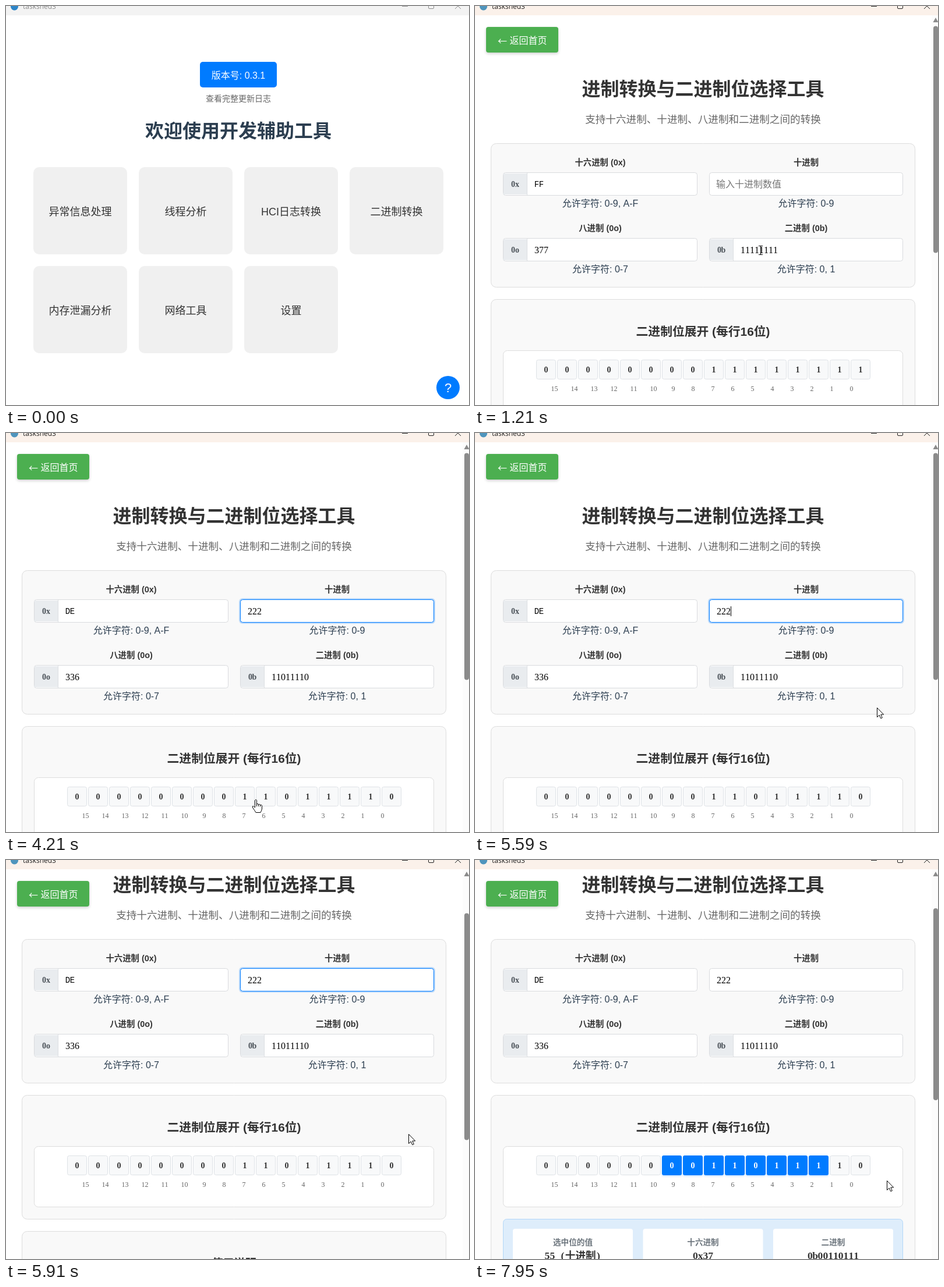
An HTML page with a canvas that plays this animation: 795 px wide and 686 px high, repeating every 8000 ms.

```html
<!DOCTYPE html>
<html lang="zh-CN">
<head>
<meta charset="utf-8">
<title>进制转换</title>
<style>
html, body { margin: 0; width: 100%; height: 100%; overflow: hidden; background: #fff; }
canvas { display: block; }
</style>
</head>
<body>
<canvas id="stage" width="795" height="686"></canvas>
<script>
const c = document.getElementById('stage').getContext('2d');
const LOOP = 8000;
const SANS = '"Liberation Sans", "Noto Sans CJK SC", sans-serif';
const SERIF = '"Liberation Serif", "Noto Sans CJK SC", serif';
const BLUE = '#007bff';

// Timeline in ms
const ACTIVE = 430, PAGE = 580, FOCUS = 2200, KEYS = [2820, 3010, 3200];
const SCROLL = 5720, DRAG = 7040, DROP = 7560, RESULT = 7620;
const PRESSES = [[430, 550], [FOCUS, 2340], [DRAG, DROP]];
const HIDDEN = [KEYS[0], 3300];

// Pointer path: time, x, y
const PATH = [
  [75, 800, 470], [380, 690, 362], [810, 690, 362], [1000, 490, 420], [1210, 490, 420],
  [1500, 166, 308], [1640, 166, 308], [1880, 430, 303], [2140, 430, 303], [2260, 431, 295],
  [2690, 431, 295], [2800, 438, 290], [3300, 438, 292], [3480, 442, 380], [3900, 500, 560],
  [4340, 410, 648], [4600, 365, 655], [4900, 595, 655], [5190, 420, 666], [5300, 440, 650],
  [5570, 690, 472], [5720, 690, 472], [5900, 691, 471], [6120, 691, 471], [6480, 423, 547],
  [6680, 356, 546], [6880, 344, 531], [7190, 344, 531], [7500, 580, 530], [7750, 580, 530],
  [7940, 707, 551], [LOOP, 707, 551]
];

const clamp = v => Math.max(0, Math.min(1, v));
const ease = v => { v = clamp(v); return v * v * (3 - 2 * v); };

function pointer(t) {
  const i = PATH.findIndex(p => p[0] > t);
  if (i < 1) return null;
  const [t0, x0, y0] = PATH[i - 1], [t1, x1, y1] = PATH[i];
  const k = ease((t - t0) / (t1 - t0));
  return { x: x0 + (x1 - x0) * k, y: y0 + (y1 - y0) * k };
}

function text(s, x, y, size, color, { bold, align = 'center', font = SANS, lift = .37 } = {}) {
  c.font = `${bold ? 'bold ' : ''}${size}px ${font}`;
  c.textAlign = align;
  c.fillStyle = color;
  c.fillText(s, x, y + size * lift);
}

// Fixed pitch: half an em for Latin, a full em for CJK
const pitch = (ch, size) => ch > '\u2000' ? size : size / 2;

function mono(s, x, y, size, color, bold) {
  for (const ch of s) {
    const w = pitch(ch, size), capital = /[A-F]/.test(ch);
    text(ch, x + w / 2, y, capital ? size * .87 : size, color,
      { bold, font: capital ? '"Liberation Mono", monospace' : SERIF, lift: .34 });
    x += w;
  }
}

function monoMid(s, x, y, size, color, bold = true) {
  const w = [...s].reduce((sum, ch) => sum + pitch(ch, size), 0);
  mono(s, x - w / 2, y, size, color, bold);
}

function box(x, y, w, h, r, fill, line) {
  c.beginPath();
  if (line) c.roundRect(x + .5, y + .5, w - 1, h - 1, r);
  else c.roundRect(x, y, w, h, r);
  c.fillStyle = fill;
  c.fill();
  if (line) { c.strokeStyle = line; c.lineWidth = 1; c.stroke(); }
}

function shadow(color, blur, dy, draw) {
  c.save();
  c.shadowColor = color;
  c.shadowBlur = blur;
  c.shadowOffsetY = dy;
  draw();
  c.restore();
}

function disc(x, y, r, fill) {
  c.beginPath();
  c.arc(x, y, r, 0, 7);
  c.fillStyle = fill;
  c.fill();
}

function titleBar(on) {
  c.fillStyle = on ? '#fbf1ea' : '#f3f3f3';
  c.fillRect(0, 0, 795, 16);
  disc(14.5, 1, 6.5, on ? '#4f95bd' : '#2e86c8');
  const ink = on ? '#222' : '#8c8c8c';
  text('taskshed3', 29, 1, 12, ink, { align: 'left', font: '"Open Sans", "Noto Sans", sans-serif' });
  c.strokeStyle = ink;
  c.lineWidth = 1;
  c.beginPath();
  c.moveTo(680, .5); c.lineTo(690, .5);
  c.roundRect(725.5, -5.5, 9, 10, 1.5);
  c.moveTo(771, -5); c.lineTo(781, 5);
  c.moveTo(781, -5); c.lineTo(771, 5);
  c.stroke();
}

const CARDS = ['异常信息处理', '线程分析', 'HCI日志转换', '二进制转换', '内存泄漏分析', '网络工具', '设置'];
const inside = (p, x, y, w, h) => p && p.x >= x && p.x < x + w && p.y >= y && p.y < y + h;

function home(p) {
  box(333, 96, 132, 44, 5, BLUE);
  text('版本号: 0.3.1', 399, 119, 16, '#fff');
  text('查看完整更新日志', 399, 159, 14, '#666');
  text('欢迎使用开发辅助工具', 399, 214, 32, '#2c3e50', { bold: true });
  CARDS.forEach((name, i) => {
    const x = 47 + i % 4 * 181, y = 277 + (i >> 2) * 170;
    box(x, y, 161, 150, 10, inside(p, x, y, 161, 150) ? '#e3e3e3' : '#f0f0f0');
    text(name, x + 80.5, y + 76, 18, '#333');
  });
  disc(759, 656, 20, BLUE);
  text('?', 759, 656, 22, '#fff');
}

function field(x, right, y, label, hint, prefix, val) {
  const mid = (x + right) / 2;
  text(label, mid, y - 17, 14.4, '#333', { bold: true });
  box(x, y, right - x, 40, 4, '#fff', '#d9dbde');
  if (prefix) {
    c.fillStyle = '#e9ecef';
    c.fillRect(x + 1, y + 2, 41, 36);
    c.fillStyle = '#dcdfe2';
    c.fillRect(x + 41, y + 1, 1, 38);
    monoMid(prefix, x + 21, y + 20.5, 14, '#495057');
    mono(val, x + 54, y + 20.5, 16, '#000');
  }
  text('允许字符: ' + hint, mid, y + 53, 16, '#2c3e50');
}

function decimal(t, typed) {
  const focus = t >= FOCUS && t < DRAG + 160;
  if (focus) {
    if (t < DRAG + 50) box(400, 284, 337, 44, 6, 'rgba(0,123,255,.25)');
    box(402, 286, 333, 40, 4, '#fff', BLUE);
  }
  if (typed) mono(typed, 415, 306.5, 16, '#000');
  else text('输入十进制数值', 414, 306, 16, '#757575', { align: 'left' });
  const since = t - (typed ? KEYS[typed.length - 1] : FOCUS);
  if (focus && t < DRAG && since % 1060 < 530) {
    c.fillStyle = '#000';
    c.fillRect(415 + typed.length * 8, 298, 1, 17);
  }
}

function bits(n, t, p) {
  const str = n.toString(2).padStart(16, '0');
  const end = t < DRAG ? -1 : t < DROP ? Math.floor((p.x - 105) / 36) : 13;
  const done = t >= DROP;
  for (let i = 0; i < 16; i++) {
    const x = 105 + i * 36, on = i >= 6 && i <= end;
    if (on && done) shadow('rgba(0,123,255,.2)', 3, 2, () => box(x, 608, 34, 34, 3, BLUE));
    else box(x, 608, 34, 34, 3, on ? '#b3d4f5' : '#f8f9fa', on ? '#a9cdf2' : '#dee2e6');
    monoMid(str[i], x + 17, 625.5, 14, on && done ? '#fff' : '#333');
    monoMid(String(15 - i), 136.5 + i * 34, 658, 12, '#666', false);
  }
}

function results() {
  box(48, 717, 687, 150, 6, '#deedfb', '#b3d7f8');
  [['选中位的值', '55 (十进制)'], ['十六进制', '0x37'], ['二进制', '0b00110111']].forEach(([k, v], i) => {
    const x = 65 + i * 223.5;
    box(x, 734, 206, 90, 4, '#fff');
    text(k, x + 103, 757, 13.6, '#6c757d', { bold: true });
    monoMid(v, x + 103, 780.5, 17.6, '#333');
  });
}

function converter(t, p, scroll) {
  const typed = '2'.repeat(KEYS.filter(k => t >= k).length);
  const n = typed ? +typed : 255;
  const open = t >= RESULT;
  c.save();
  c.beginPath();
  c.rect(0, 16, 795, 670);
  c.clip();
  c.save();
  c.translate(0, -scroll);
  text('进制转换与二进制位选择工具', 391.5, 142, 32, '#333', { bold: true });
  text('支持十六进制、十进制、八进制和二进制之间的转换', 391.5, 194, 17.6, '#666');
  box(27, 236, 729, 248, 9, '#f9f9f9', '#ddd');
  field(48, 382, 286, '十六进制 (0x)', '0-9, A-F', '0x', n.toString(16).toUpperCase());
  field(402, 735, 286, '十进制', '0-9');
  field(48, 382, 399, '八进制 (0o)', '0-7', '0o', n.toString(8));
  field(402, 735, 399, '二进制 (0b)', '0, 1', '0b', n.toString(2));
  decimal(t, typed);
  box(27, 504, 729, open ? 400 : 214, 9, '#f9f9f9', '#ddd');
  text('二进制位展开 (每行16位)', 391.5, 559, 20.8, '#333', { bold: true });
  box(48, 592, 687, 105, 7, '#fff', '#ddd');
  bits(n, t, p);
  if (open) results();
  else {
    box(27, 738, 729, 300, 9, '#f9f9f9', '#ddd');
    text('使用说明', 391.5, 792.5, 19.2, '#333', { bold: true });
  }
  c.restore();

  shadow('rgba(0,0,0,.2)', 5, 2, () => box(19, 36, 124, 44, 4, '#4caf50'));
  text('←', 47, 60, 16, '#fff', { font: '"Noto Sans CJK SC", sans-serif' });
  text('返回首页', 91.5, 59, 16, '#fff');

  c.fillStyle = '#fcfcfc';
  c.fillRect(784, 16, 11, 670);
  c.fillStyle = '#8b8b8b';
  c.beginPath();
  c.moveTo(791, 20); c.lineTo(795.5, 28); c.lineTo(786.5, 28);
  c.fill();
  box(787, open ? 83 : 34.5 + scroll * .57, 8, open ? 330 : 390, 4, '#8b8b8b');
  c.restore();
}

function shape(kind) {
  c.lineWidth = 1;
  c.strokeStyle = '#000';
  c.fillStyle = '#fff';
  c.lineJoin = 'round';
  if (kind === 'beam') {
    c.beginPath();
    c.moveTo(-3, -7.5); c.lineTo(4, -7.5);
    c.moveTo(-3, 7.5); c.lineTo(4, 7.5);
    c.moveTo(.5, -7.5); c.lineTo(.5, 7.5);
    c.stroke();
    return;
  }
  const d = kind === 'hand'
    ? 'M-1.5 1.5Q0-1 1.5 1.5V8Q3 6.5 4.5 8.5Q6 7.5 7.5 9.5Q10 8.5 10.5 11V16Q10 19 8 22.5H0Q-2 19-5.5 14Q-6.5 11-4 11.5L-1.5 14Z'
    : 'M.5 .5V16.5L4.2 13L6.8 18.7L9.3 17.6L6.8 12H11.7Z';
  const path = new Path2D(d);
  c.fill(path);
  c.stroke(path);
  if (kind === 'hand') c.stroke(new Path2D('M1.5 8V12M4.5 8.5V12M7.5 9.5V12.5'));
}

function cursorKind(p, t, scroll) {
  if (t < PAGE) return inside(p, 590, 277, 161, 150) ? 'hand' : 'arrow';
  const q = { x: p.x, y: p.y + scroll };
  if (inside(q, 105, 608, 574, 34)) return 'hand';
  for (const y of [286, 399])
    if (inside(q, 90, y, 292, 40) || inside(q, y === 286 ? 402 : 444, y, 291, 40)) return 'beam';
  return 'arrow';
}

function draw(t) {
  const p = pointer(t);
  const scroll = 100 * ease((t - SCROLL) / 180);
  c.fillStyle = '#fff';
  c.fillRect(0, 0, 795, 686);
  if (t < PAGE) home(p);
  else converter(t, p, scroll);
  titleBar(t >= ACTIVE);
  if (!p || (t >= HIDDEN[0] && t < HIDDEN[1])) return;
  if (PRESSES.some(([a, b]) => t >= a && t < b)) disc(p.x, p.y, 12, 'rgba(222,228,60,.75)');
  c.save();
  c.translate(Math.round(p.x), Math.round(p.y));
  shape(cursorKind(p, t, scroll));
  c.restore();
}

const start = performance.now();
function tick() {
  draw((performance.now() - start) % LOOP);
  requestAnimationFrame(tick);
}
tick();
</script>
</body>
</html>
```
